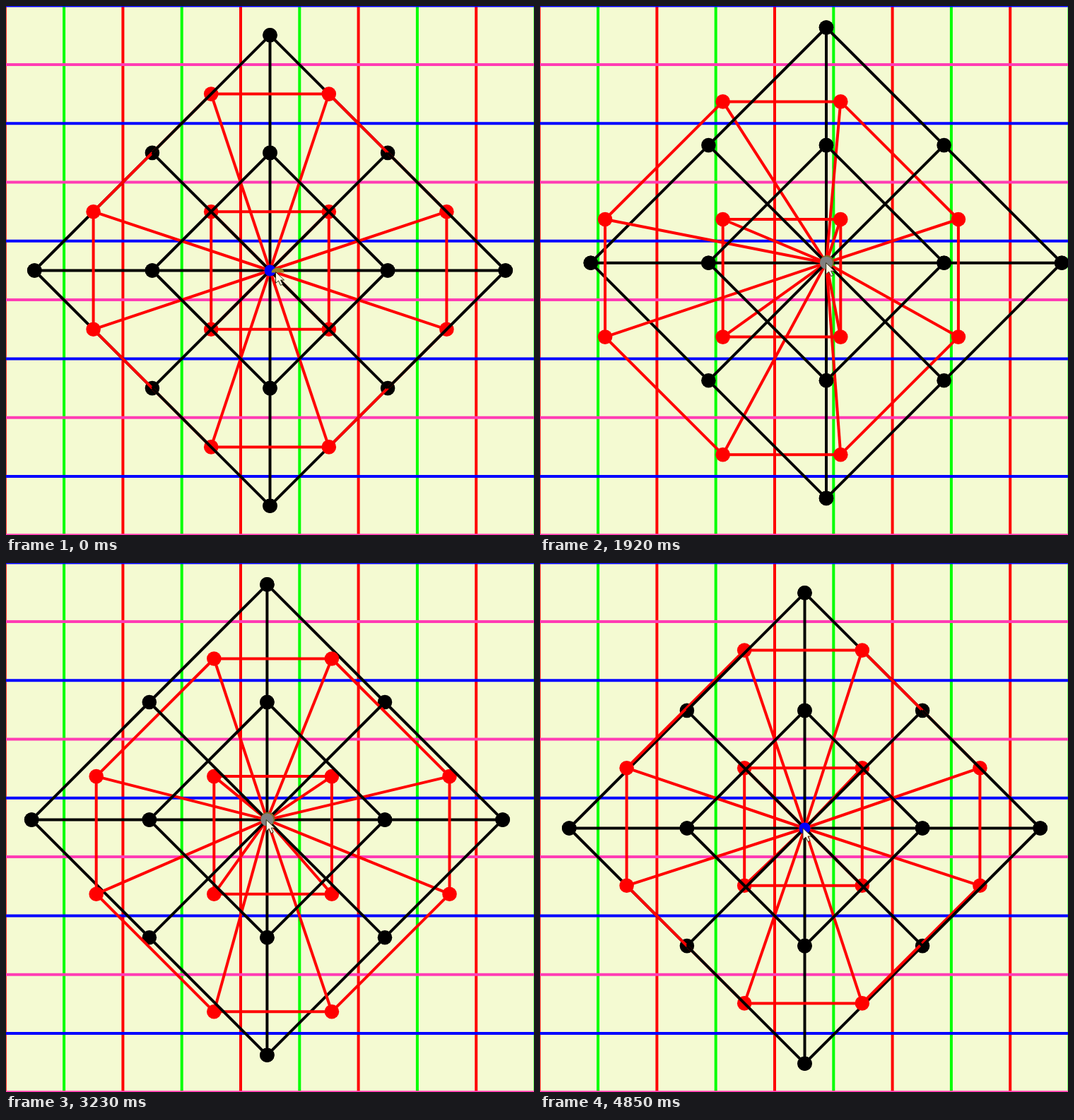
Write an HTML page with a canvas that moves like this. It is 747 by 749 pixels and loops after 4.9 s.

```html
<!DOCTYPE html>
<html lang="en">
<head>
<meta charset="utf-8">
<title>Mirrored lattices</title>
<style>
html, body { margin: 0; width: 100%; height: 100%; overflow: hidden; background: #f4fad2; }
canvas { display: block; }
</style>
</head>
<body>
<canvas id="stage" width="747" height="749"></canvas>
<script>
const ctx = document.getElementById('stage').getContext('2d');
const LOOP = 4900;
const U = 83.3;
const CENTER = [373.5, 374.5];
const BLACK = '#000', RED = '#f00';

// Bursts of movement: first step, last step (ms), number of steps
const BURSTS = [
  [340, 810, 9], [880, 1400, 9], [1460, 1920, 8],
  [1990, 2480, 9], [2550, 2860, 6], [3120, 3590, 10],
  [3670, 4160, 9], [4230, 4590, 7], [4730, 4850, 3]
];

// Dragged path: step, x, y
const PATH = [
  [0, 373.5, 374.5], [4, 386.3, 386], [9, 355.5, 401.5], [12, 351, 382],
  [15, 365, 361], [18, 386.5, 345.5], [22, 398.5, 351], [26, 405, 363.7],
  [30, 396, 383], [35, 366.5, 397.5], [38, 356, 389.5], [41, 354.5, 375.5],
  [44, 369.4, 363.6], [47, 379.5, 367], [51, 384.5, 378], [56, 375, 390.3],
  [58, 368.5, 392], [60, 361.5, 388.5], [63, 363, 381], [67, 373.5, 375.5],
  [70, 374.5, 375.5]
];

function stepAt(t) {
  let step = 0;
  for (const [from, to, n] of BURSTS) {
    const done = Math.floor((t + 8 - from) / ((to - from) / (n - 1))) + 1;
    step += Math.max(0, Math.min(n, done));
  }
  return step;
}

// Cubic Hermite curve through the path points
function pointAt(step) {
  const last = PATH.length - 1;
  let i = 0;
  while (i < last - 1 && PATH[i + 1][0] <= step) i++;
  const a = PATH[i], b = PATH[i + 1];
  const span = b[0] - a[0], s = (step - a[0]) / span;
  const slope = (k, axis) => {
    const p = PATH[Math.max(0, k - 1)], q = PATH[Math.min(last, k + 1)];
    return (q[axis] - p[axis]) / (q[0] - p[0]) * span;
  };
  return [1, 2].map(axis =>
    (2 * s ** 3 - 3 * s * s + 1) * a[axis] + (s ** 3 - 2 * s * s + s) * slope(i, axis) +
    (3 * s * s - 2 * s ** 3) * b[axis] + (s ** 3 - s * s) * slope(i + 1, axis));
}

const place = ([ox, oy], [x, y]) => [ox + x * U, oy + y * U];

function line(a, b, color) {
  ctx.strokeStyle = color;
  ctx.lineWidth = 4;
  ctx.beginPath();
  ctx.moveTo(...a);
  ctx.lineTo(...b);
  ctx.stroke();
}

function dot([x, y], r, color) {
  ctx.fillStyle = color;
  ctx.beginPath();
  ctx.arc(x, y, r, 0, 2 * Math.PI);
  ctx.fill();
}

// Segments given in lattice units as [x1, y1, x2, y2]
function segments(origin, list, color) {
  for (const [x1, y1, x2, y2] of list)
    line(place(origin, [x1, y1]), place(origin, [x2, y2]), color);
}

const SIGNS = [[1, 1], [1, -1], [-1, 1], [-1, -1]];
const mirror = points => points.flatMap(([x, y]) => SIGNS.map(([i, j]) => [x * i, y * j]));

const BLACK_DOTS = mirror([[4, 0], [0, 4], [2, 0], [0, 2], [2, 2]]);
const RED_DOTS = mirror([[1, 1], [1, 3], [3, 1]]);
const LOWER = [
  [-4, 0, 4, 0], [0, -4, 0, 4],
  ...[1, -1].flatMap(j => [[-4, 0, -2, 2 * j], [0, 4 * j, 2, 2 * j]])
];
const UPPER = [
  ...[1, -1].flatMap(j => [[-2, 2 * j, 0, 4 * j], [2, 2 * j, 4, 0]]),
  ...SIGNS.flatMap(([i, j]) => [[0, 0, 2 * i, 2 * j], [2 * i, 0, 0, 2 * j]])
];
const RED_EDGES = [
  ...[1, -1].flatMap(k => [
    [-1, k, 1, k], [k, -1, k, 1], [-1, 3 * k, 1, 3 * k], [3 * k, -1, 3 * k, 1]
  ]),
  ...SIGNS.map(([i, j]) => [i, 3 * j, 3 * i, j])
];

function drawGrid() {
  ctx.fillStyle = '#f4fad2';
  ctx.fillRect(0, 0, 747, 749);
  for (let i = 0; i < 10; i++) {
    const x = i * U - 1.2;
    line([x, 0], [x, 749], i % 2 ? '#0f0' : RED);
  }
  for (let i = 0; i < 10; i++) {
    const y = i * U - 0.4;
    line([0, y], [747, y], i % 2 ? '#ff3cb4' : '#00f');
  }
}

function drawCursor(x, y) {
  ctx.save();
  ctx.translate(x, y);
  ctx.beginPath();
  [[0, 0], [0, 16], [4, 12.5], [7, 19], [10, 17.5], [7, 11.5], [12, 11.5]]
    .forEach(p => ctx.lineTo(...p));
  ctx.closePath();
  ctx.fillStyle = '#fffbe6';
  ctx.fill();
  ctx.lineWidth = 1;
  ctx.strokeStyle = '#332c10';
  ctx.stroke();
  ctx.restore();
}

function drawHandle([x, y], step) {
  const idle = step === 0;
  if (idle || step > 67) {
    dot([x, y], 8, '#00f');
  } else {
    dot([x + 1, y - 1], 10, '#806a28');
    dot([x, y], 9, '#808080');
  }
  if (idle) {
    ctx.fillStyle = '#958126';
    ctx.beginPath();
    ctx.ellipse(x + 11, y + 3, 9, 7, 0, Math.PI, 2 * Math.PI);
    ctx.fill();
    drawCursor(x + 8, y + 2);
  } else {
    drawCursor(x + 1 - step / 20, y);
  }
}

function draw(t) {
  const step = stepAt(t);
  const p = pointAt(step);
  const q = [2 * CENTER[0] - p[0], 2 * CENTER[1] - p[1]];
  drawGrid();
  segments(p, LOWER, BLACK);
  BLACK_DOTS.forEach(d => dot(place(p, d), 10.3, BLACK));
  segments(q, RED_EDGES, RED);
  RED_DOTS.forEach(d => {
    line(p, place(q, d), RED);
    dot(place(q, d), 10.3, RED);
  });
  segments(p, UPPER, BLACK);
  drawHandle(p, step);
}

const start = performance.now();
function tick() {
  draw((performance.now() - start) % LOOP);
  requestAnimationFrame(tick);
}
tick();
</script>
</body>
</html>
```
